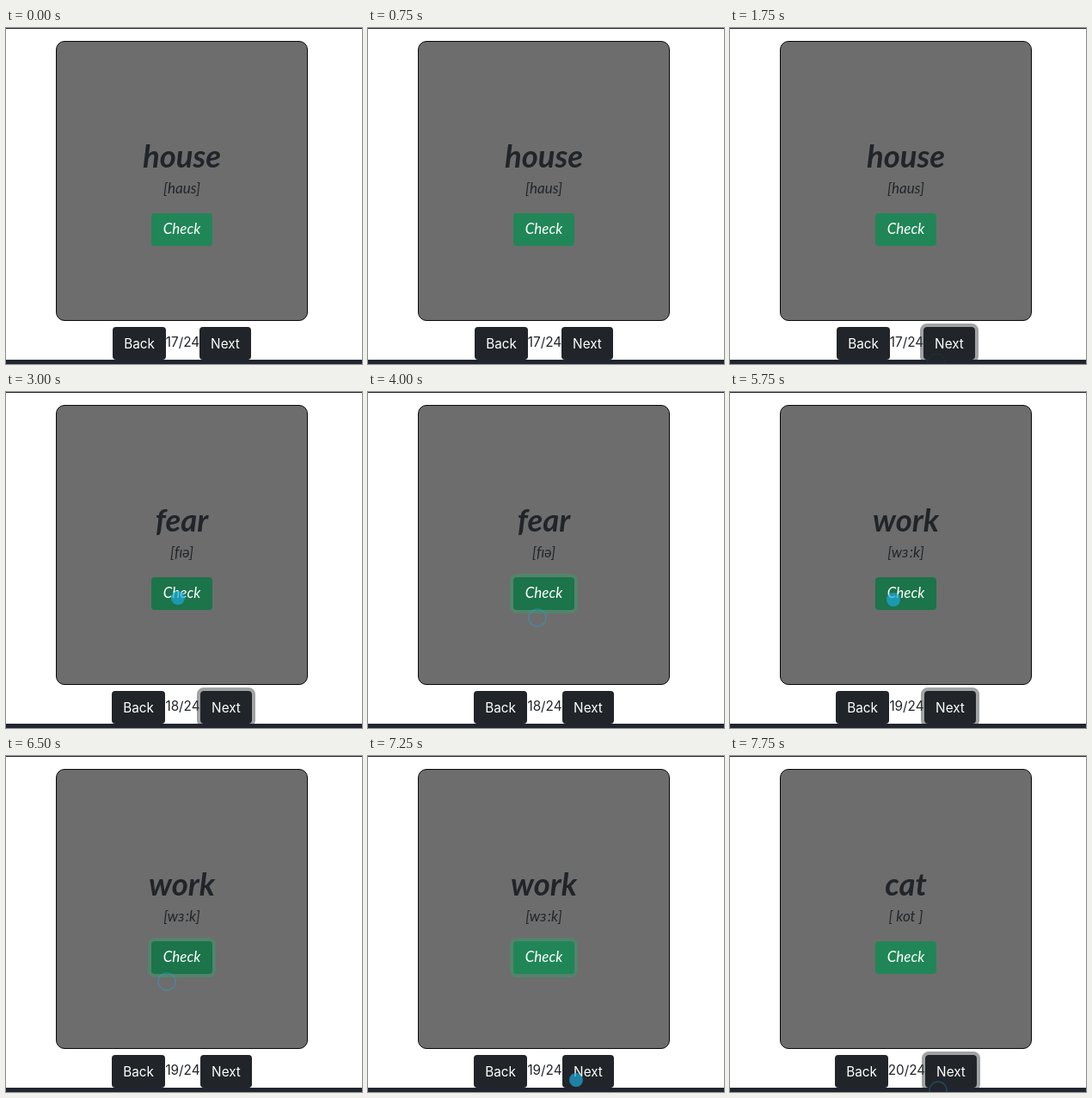
These frames come from a looping animation (414 px wide and 390 px high, 8000 ms). An HTML page:

```html
<!DOCTYPE html>
<html lang="en">
<head>
<meta charset="utf-8">
<title>Word cards</title>
<style>
  html, body { margin: 0; width: 100%; height: 100%; overflow: hidden; background: #fff; }
  svg { display: block; width: 414px; height: 390px; }
  text { text-anchor: middle; fill: #212529; }
  .card-text { font: italic 17px Lato, "Open Sans", sans-serif; }
  .word { font-size: 36.5px; font-weight: 700; }
  .ui { font: 15.3px Inter, Roboto, sans-serif; }
  .light { fill: #fff; }
  .dark { fill: #212529; }
  .ring { fill: none; stroke-width: 4; }
</style>
</head>
<body>
<svg viewBox="0 0 414 390">
  <clipPath id="aboveBar"><rect x="-10" width="100" height="385"/></clipPath>
  <rect class="dark" width="414" height="1"/>
  <rect x="58.5" y="15.5" width="292" height="324" rx="9.5" fill="#6d6d6d" stroke="#080808"/>
  <g class="card-text">
    <text id="word" class="word" x="204.5" y="162"></text>
    <text id="sound" x="204.5" y="192"></text>
    <rect id="checkRing" class="ring" x="167" y="213" width="75" height="42" rx="6" stroke="#3c996e" stroke-opacity=".5"/>
    <rect id="check" x="169" y="215" width="71" height="38" rx="4"/>
    <text class="light" x="204.5" y="239">Check</text>
  </g>
  <rect y="385" width="414" height="5" fill="#212530"/>
  <g class="ui">
    <g id="back">
      <rect class="dark" y="347" width="62" height="38" rx="4"/>
      <text class="light" x="31" y="372">Back</text>
    </g>
    <text id="count" x="205.5" y="370"></text>
    <g id="next">
      <rect id="nextRing" class="ring" x="-2" y="345" width="64" height="42" rx="6" stroke="#424649" stroke-opacity=".5" clip-path="url(#aboveBar)"/>
      <rect class="dark" y="347" width="60" height="38" rx="4"/>
      <text class="light" x="30" y="372">Next</text>
    </g>
  </g>
  <circle id="pointer" stroke-width="1.3"/>
</svg>
<script>
const LOOP = 8000;
const BLUE = "#1ca9dc";
const $ = id => document.getElementById(id);

const cards = [
  { word: "house", sound: "[haus]", count: "17/24", back: 124, next: 225 },
  { word: "fear", sound: "[fɪə]", count: "18/24", back: 123, next: 226 },
  { word: "work", sound: "[wɜːk]", count: "19/24", back: 123, next: 226 },
  { word: "cat", sound: "[ kot ]", count: "20/24", back: 122, next: 227 }
];

const press = (x, y) => ({ x, y, r: 8, fill: 0.7, line: 0 });
const ripple = (x, y, line) => ({ x, y, r: 10, fill: 0, line });

// Each step: start time, card, focused button, Check hovered, pointer mark
const steps = [
  [0, 0, "", false],
  [250, 0, "", false, ripple(300, 317, 0.4)],
  [500, 0, "", false, ripple(246, 373, 0.3)],
  [750, 0, "", false],
  [1250, 0, "", false, press(241, 378)],
  [1500, 0, "next", false, press(240, 380)],
  [1750, 0, "next", false, ripple(240, 388, 0.06)],
  [2000, 1, "next", false, ripple(240, 388, 0.05)],
  [2250, 1, "next", false, ripple(240, 388, 0.04)],
  [2500, 1, "next", false],
  [2750, 1, "next", true, ripple(204, 246, 0.4)],
  [3000, 1, "next", true, press(200, 239)],
  [3250, 1, "check", true, press(199, 240)],
  [3500, 1, "check", true, ripple(198, 243, 0.5)],
  [3750, 1, "check", true, ripple(197, 253, 0.5)],
  [4000, 1, "check", true, ripple(197, 262, 0.45)],
  [4250, 1, "check", false, press(241, 378)],
  [4500, 1, "check", false, ripple(241, 388, 0.2)],
  [4750, 2, "check", false],
  [5000, 2, "next", false],
  [5500, 2, "next", true, ripple(196, 246, 0.4)],
  [5750, 2, "next", true, press(190, 241)],
  [6000, 2, "check", true, press(189, 241)],
  [6250, 2, "check", true, ripple(188, 252, 0.5)],
  [6500, 2, "check", true, ripple(187, 262, 0.45)],
  [6750, 2, "check", false, ripple(200, 300, 0.3)],
  [7000, 2, "check", false],
  [7250, 2, "check", false, press(242, 376)],
  [7500, 2, "next", false, press(242, 379)],
  [7750, 3, "next", false, ripple(242, 388, 0.3)]
];

function set(id, attrs) {
  for (const name in attrs) $(id).setAttribute(name, attrs[name]);
}

function show([, index, focus, hover, mark]) {
  const card = cards[index];
  for (const id of ["word", "sound", "count"]) $(id).textContent = card[id];
  for (const id of ["back", "next"]) set(id, { transform: `translate(${card[id]} 0)` });
  for (const id of ["check", "next"]) set(id + "Ring", { visibility: focus === id ? "visible" : "hidden" });
  set("check", { fill: hover ? "#1b744a" : "#208657" });
  set("pointer", { visibility: mark ? "visible" : "hidden" });
  if (mark) {
    set("pointer", {
      cx: mark.x, cy: mark.y, r: mark.r,
      fill: BLUE, "fill-opacity": mark.fill,
      stroke: BLUE, "stroke-opacity": mark.line
    });
  }
}

const start = performance.now();
let current;

function tick(now) {
  const time = Math.max(0, now - start) % LOOP;
  const step = steps.findLast(([at]) => at <= time);
  if (step !== current) show(current = step);
  requestAnimationFrame(tick);
}

tick(start);
</script>
</body>
</html>
```
